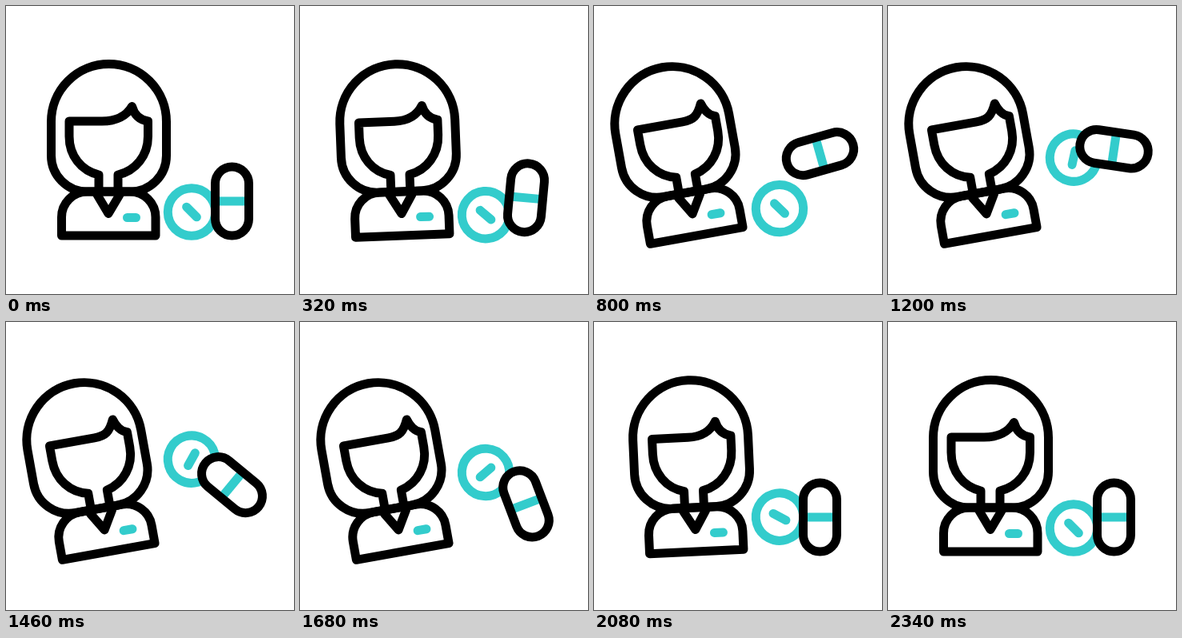
Write an HTML page that moves like this. It is 360x360 px and loops after 2.4 s.

```html
<!DOCTYPE html>
<html lang="en">
<head>
<meta charset="utf-8">
<title>Pharmacist</title>
<style>
html, body { margin: 0; width: 100%; height: 100%; overflow: hidden; background: #fff; }
svg { display: block; width: 100vw; height: 100vh; }
svg * { stroke-linecap: round; stroke-linejoin: round; stroke-width: 11; }
.line { fill: none; stroke: #000; }
.teal { fill: none; stroke: #33cccc; }
.flat { stroke-linecap: butt; }
</style>
</head>
<body>
<svg viewBox="0 0 360 360">
  <g id="woman">
    <path id="hair" class="line" d="M56.5 144.5a72 72 0 0 1 144 0V187a45 45 0 0 1-45 45H101.500a45 45 0 0 1-45-45Z"/>
    <path class="line" d="M69.500 287V264a32 32 0 0 1 32-32H155a32 32 0 0 1 32 32V287Z"/>
    <path class="line" d="M114 236L128 259.500L142 236"/>
    <path id="face" class="line"/>
    <path class="teal" d="M151.500 264.500H162.500"/>
  </g>
  <g id="tablet">
    <circle class="teal" r="29.700"/>
    <path class="teal" d="M-9 0H9"/>
  </g>
  <g id="pill">
    <rect x="-21" y="-43" width="42" height="86" rx="21" fill="#fff"/>
    <path class="teal flat" d="M-20 0H20"/>
    <rect class="line" x="-21" y="-43" width="42" height="86" rx="21"/>
  </g>
</svg>
<script>
const LOOP = 2400;
// Steps are [time, ...values]; values ease between steps.
const TILT = [[200, 0], [600, 1], [1800, 1], [2220, 0]];
const PILL = [[200, 244, 0], [1020, 172, 90], [1980, 244, 180]];
const TABLET = [[200, 257.5, 45], [560, 271.5, 27], [1440, 171.5, 119], [2300, 257.5, 225]];

const $ = id => document.getElementById(id);
const woman = $('woman'), hair = $('hair'), face = $('face'), pill = $('pill'), tablet = $('tablet');
const mix = (a, b, p) => a + (b - a) * p;

function at(steps, t) {
  if (t <= steps[0][0]) return steps[0].slice(1);
  for (let i = 1; i < steps.length; i++) {
    const a = steps[i - 1], b = steps[i];
    if (t < b[0]) {
      const p = (t - a[0]) / (b[0] - a[0]), e = p * p * (3 - 2 * p);
      return a.slice(1).map((v, j) => mix(v, b[j + 1], e));
    }
  }
  return steps[steps.length - 1].slice(1);
}

// The fringe stiffens and its tip slides right as the head tilts.
function facePath(k) {
  const start = mix(120, 136, k), tip = mix(157.5, 162.5, k);
  return `M116 232V211C94 206 79 187 79 163V144H${start}` +
    `C${mix(138, 150, k)} 144 ${mix(151, 156, k)} ${mix(137, 140, k)} ${tip} 125.5` +
    `C${tip + 2} 133 ${tip + 7} 142 177.500 144V163C177.500 187 162 206 140 211V232`;
}

function draw(t) {
  const [k] = at(TILT, t), [py, pr] = at(PILL, t), [ty, tr] = at(TABLET, t);
  woman.setAttribute('transform', `rotate(${-10.2 * k} 128 287)`);
  hair.setAttribute('transform', `translate(${-5.5 * k} 0)`);
  face.setAttribute('d', facePath(k));
  pill.setAttribute('transform', `translate(282.5 ${py}) rotate(${pr})`);
  tablet.setAttribute('transform', `translate(232 ${ty}) rotate(${tr})`);
}

const begin = performance.now();
function tick(now) {
  draw(Math.max(0, now - begin) % LOOP);
  requestAnimationFrame(tick);
}
draw(0);
requestAnimationFrame(tick);
</script>
</body>
</html>
```
